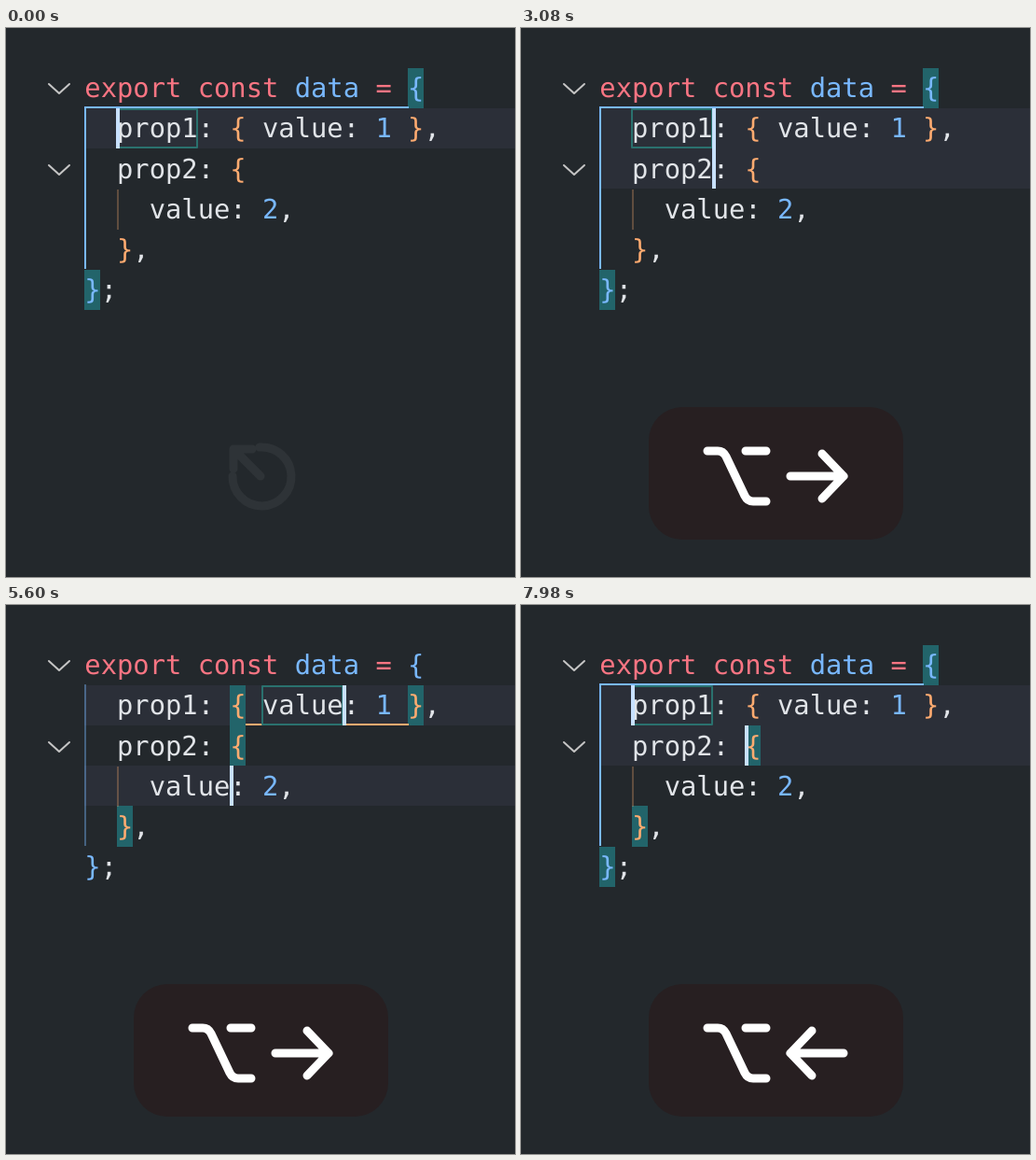
An HTML page with a canvas that plays this animation: 546 by 588 pixels, repeating every 8 s.

```html
<!DOCTYPE html>
<html lang="en">
<head>
<meta charset="utf-8">
<title>Multi-cursor editing</title>
<style>
  html, body { margin: 0; width: 100%; height: 100%; overflow: hidden; background: #23282c; }
  canvas { display: block; }
</style>
</head>
<body>
<canvas id="stage" width="546" height="588"></canvas>
<script>
const ctx = document.getElementById('stage').getContext('2d');
const LOOP = 8000;
const FONT_SIZE = 28.8, CHAR = FONT_SIZE * 0.602, ROW = 43.2, LEFT = 84.3, TOP = 42.6;
const PINK = '#f97583', BLUE = '#79b8ff', ORANGE = '#ffab70', TEXT = '#e1e4e8';
const ROW_LIGHT = '#2b2f38', MATCH = '#22646a', WORD_BOX = '#2a716e', CURSOR = '#c8e1ff', PANEL = '#271f21';

// Each line: column, text, colour, ...
const lines = [
  [0, 'export', PINK, 7, 'const', PINK, 13, 'data', BLUE, 18, '=', PINK, 20, '{', BLUE],
  [2, 'prop1:', TEXT, 9, '{', ORANGE, 11, 'value:', TEXT, 18, '1', BLUE, 20, '}', ORANGE, 21, ',', TEXT],
  [2, 'prop2:', TEXT, 9, '{', ORANGE],
  [4, 'value:', TEXT, 11, '2', BLUE, 12, ',', TEXT],
  [2, '}', ORANGE, 3, ',', TEXT],
  [0, '}', BLUE, 1, ';', TEXT],
];

// Bracket pairs as [row, column] of both ends
const OUTER = [[0, 20], [5, 0]], FIRST = [[1, 9], [1, 20]], SECOND = [[2, 9], [4, 2]];

const OPTION = 'M200 453H211Q217 453 220 459L240 501Q243 507 249 507H263M241 453H263';
const panels = {
  escape: { x: 137, w: 273, path: 'M272 449A31.5 31.5 0 1 1 243 480M273 480L246 453M244 472V451H264' },
  addBelow: { x: 102, w: 341, path: 'M165 480L192 452L219 480M277 451L243 485H261V509H292V485H310ZM358 451V508M335 486L358 509L381 486' },
  right: { x: 137, w: 273, path: OPTION + 'M289 480H346M323 456L346 480L323 504' },
  left: { x: 137, w: 273, path: OPTION + 'M346 480H289M312 456L289 480L312 504' },
};

// Key presses: the first cursor stays in row 1, the second is [row, column]
const presses = [
  { at: 0, col: 2, second: null, keys: 'escape' },
  { at: 700, col: 2, second: [2, 2], keys: 'addBelow' },
  { at: 2800, col: 7, second: [2, 7], keys: 'right' },
  { at: 3640, col: 8, second: [2, 8], keys: 'right' },
  { at: 4480, col: 10, second: [2, 10], keys: 'right' },
  { at: 5320, col: 16, second: [3, 9], keys: 'right' },
  { at: 6160, col: 11, second: [3, 4], keys: 'left' },
  { at: 7000, col: 9, second: [3, 0], keys: 'left' },
  { at: 7700, col: 2, second: [2, 9], keys: 'left' },
];

const clamp = v => Math.max(0, Math.min(1, v));
const colX = col => LEFT + col * CHAR;
const rowY = row => Math.round(TOP + row * ROW);

function fill(color, x, y, w, h) {
  ctx.fillStyle = color;
  ctx.fillRect(x, y, w, h);
}

function stroke(path, color, width) {
  ctx.strokeStyle = color;
  ctx.lineWidth = width;
  ctx.stroke(new Path2D(path));
}

function fillCells(color, row, col, width) {
  fill(color, Math.round(colX(col)), rowY(row), width, rowY(row + 1) - rowY(row));
}

function drawGuides(col) {
  const inFirst = col > 9 && col < 21;
  ctx.globalAlpha = inFirst ? 0.4 : 1;
  fill(BLUE, 84, rowY(1) - 1, 2, rowY(5) - rowY(1));
  ctx.globalAlpha = 0.28;
  fill(ORANGE, 119, rowY(3) + 1, 2, 43);
  ctx.globalAlpha = 1;
  if (inFirst) fill(ORANGE, 257, rowY(2) - 2, 175, 2);
  else fill(BLUE, 84, rowY(1) - 2, 348, 2);
}

function drawEditor({ col, second }) {
  const cursors = [[1, col], ...(second ? [second] : [])];
  for (const [row] of cursors) fillCells(ROW_LIGHT, row, 0, 546);

  const pairs = new Set([col >= 9 ? FIRST : OUTER]);
  if (second) pairs.add(second[0] === 2 && second[1] < 9 ? OUTER : SECOND);
  for (const pair of pairs)
    for (const [row, c] of pair) fillCells(MATCH, row, c, 17);

  drawGuides(col);

  const word = [[2, 7], [11, 16]].find(([from, to]) => col >= from && col <= to);
  if (word) {
    ctx.strokeStyle = WORD_BOX;
    ctx.lineWidth = 2;
    ctx.strokeRect(Math.round(colX(word[0])), rowY(1) + 1, 86, 41);
  }

  ctx.font = `${FONT_SIZE}px "DejaVu Sans Mono", monospace`;
  ctx.textRendering = 'geometricPrecision';
  lines.forEach((line, row) => {
    for (let i = 0; i < line.length; i += 3) {
      ctx.fillStyle = line[i + 2];
      ctx.fillText(line[i + 1], colX(line[i]), TOP + row * ROW + 31.6);
    }
  });

  stroke('M46 60L57 70L68 60M46 147L57 157L68 147', '#c5c5c5', 2);
  for (const [row, c] of cursors)
    fill(CURSOR, Math.round(colX(c) - 0.5), rowY(row), 4, rowY(row + 1) - rowY(row));
}

function drawKeys(keys, t) {
  let alpha = 1;
  if (keys === 'escape') alpha = 0.05 * clamp(1 - t / 140);
  if (keys === 'addBelow') alpha = clamp((2140 - t) / 390);
  const { x, w, path } = panels[keys];

  // The panel fades sooner than its symbols
  ctx.globalAlpha = clamp(3 * alpha - 2);
  ctx.fillStyle = PANEL;
  ctx.beginPath();
  ctx.roundRect(x, 406, w, 142, 36);
  ctx.fill();
  ctx.globalAlpha = alpha;
  stroke(path, '#fff', 9);
  ctx.globalAlpha = 1;
}

function draw(now) {
  const t = now % LOOP;
  const press = presses.findLast(p => p.at <= t);
  ctx.lineCap = ctx.lineJoin = 'round';
  fill('#23282c', 0, 0, 546, 588);
  drawEditor(press);
  drawKeys(press.keys, t);
}

let start;
function tick(now) {
  start ??= now;
  draw(now - start);
  requestAnimationFrame(tick);
}
draw(0);
requestAnimationFrame(tick);
</script>
</body>
</html>
```
